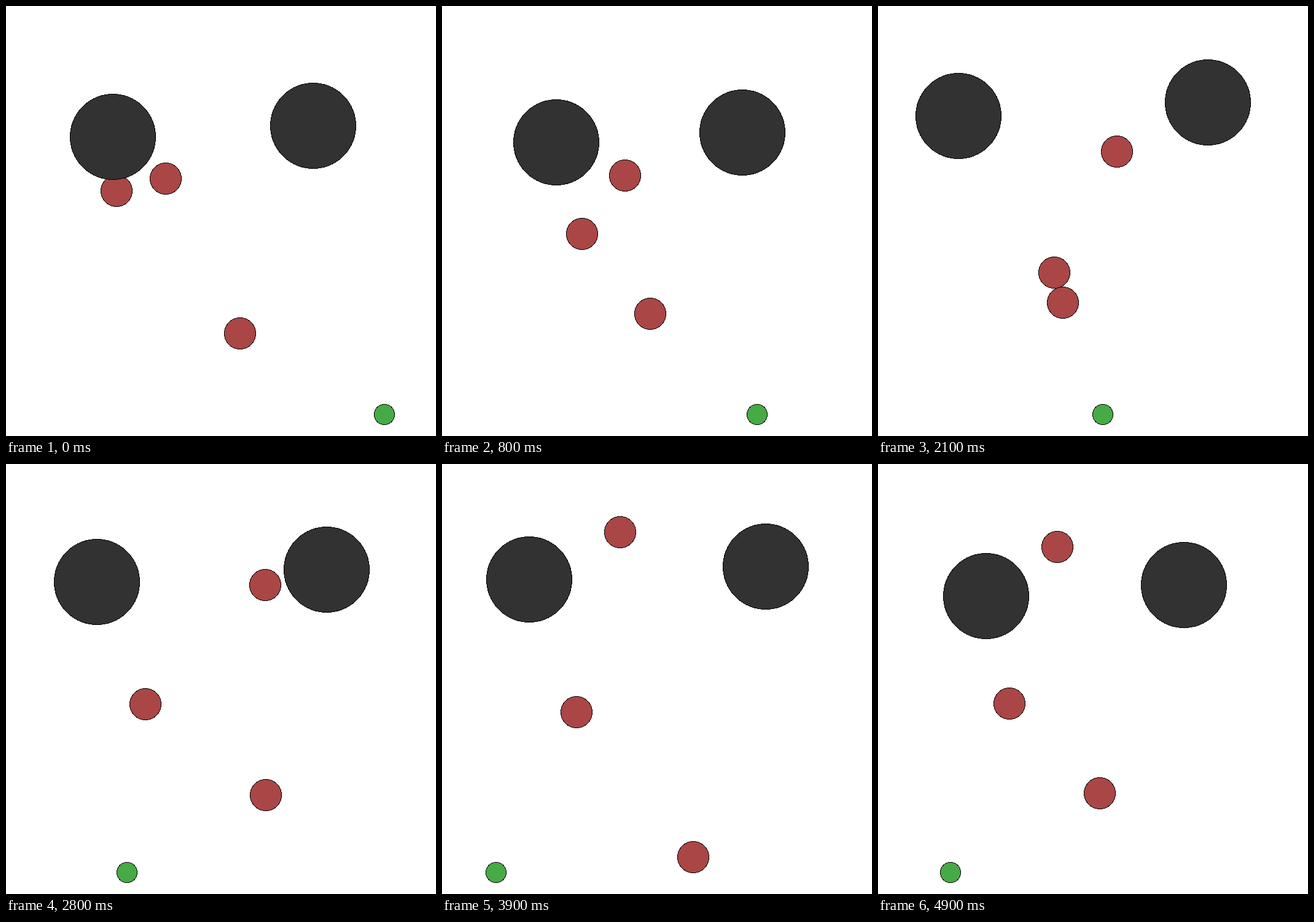
Animation, 700 px wide and 700 px high, one loop 5000 ms. Source, as an HTML page with a canvas:

```html
<!DOCTYPE html>
<html>
<head>
<meta charset="utf-8">
<style>
html, body { margin: 0; height: 100%; overflow: hidden; background: #fff; }
canvas { display: block; }
</style>
</head>
<body>
<canvas id="stage" width="700" height="700"></canvas>
<script>
const ctx = document.getElementById('stage').getContext('2d');
const LOOP = 5000, STEP = 100, MID = 350, WALL = 35, FLOOR = 665;
const RED = 'rgb(170,70,70)', GREEN = 'rgb(70,170,70)', DARK = 'rgb(50,50,50)';

// Waypoints, all reached at the same beats (seconds)
const beats = [0, .8, 2.1, 2.8, 3.5, 3.7, 4.3, 4.9];
const reds = [
  { x: [381, 339, 301, 423, 417, 414, 398, 361], y: [533, 501, 483, 539, 649, 655, 584, 536] },
  { x: [180, 228, 287, 227, 267, 247, 177, 214], y: [301, 371, 434, 391, 395, 399, 413, 390] },
  { x: [260, 298, 389, 422, 336, 312, 262, 292], y: [281, 276, 237, 197, 118, 95, 157, 135] }
];
const run = [616, 513, 366, 197, 148, 125, 29, 118];

// The dark pair swings in and out from the middle; these are its turns
const turns = [0, .3, 1.05, 2.5, 2.95, 3.66, 5, 6];
const reach = [1, 1.078, .879, 1.331, 1.084, 1.198, .983, 1.1];
const pair = [[-175.5, -136.8], [150.2, -154.5]];

// Smooth curve through the values, at rest wherever the direction turns
function glide(times, values, t) {
  const last = times.length - 1;
  const slope = i => (values[i + 1] - values[i]) / (times[i + 1] - times[i]);
  const speed = i => {
    const a = slope(Math.max(i - 1, 0)), b = slope(Math.min(i, last - 1));
    return a * b > 0 ? 2 * a * b / (a + b) : 0;
  };
  let i = 0;
  while (i < last - 1 && t >= times[i + 1]) i++;
  const h = times[i + 1] - times[i], u = (t - times[i]) / h, v = 1 - u;
  return v * v * (1 + 2 * u) * values[i] + u * u * (3 - 2 * u) * values[i + 1]
    + h * u * v * (v * speed(i) - u * speed(i + 1));
}

// Hard-edged disc, one pixel row at a time
function disc(x, y, r, fill) {
  ctx.fillStyle = fill;
  for (let row = -r; row < r; row++) {
    const w = Math.round(Math.sqrt(r * r - (row + .5) ** 2));
    ctx.fillRect(x - w, y + row, 2 * w, 1);
  }
}

function ball(x, y, r, fill) {
  x = Math.floor(x + 1e-6);
  y = Math.floor(y + 1e-6);
  disc(x, y, r, '#000');
  disc(x, y, r - 1, fill);
}

function draw(now) {
  const t = Math.floor(now % LOOP / STEP) * STEP / 1000;
  ctx.clearRect(0, 0, 700, 700);
  for (const { x, y } of reds) ball(glide(beats, x, t), glide(beats, y, t), 26, RED);

  // Past the wall the green ball climbs instead
  const x = glide(beats, run, t);
  ball(Math.max(x, WALL), FLOOR - Math.max(WALL - x, 0), 17, GREEN);

  const k = glide(turns, reach, t);
  for (const [dx, dy] of pair) ball(MID + dx * k, MID + dy * k, 70, DARK);
}

let start;
function tick(now) {
  start ??= now;
  draw(now - start);
  requestAnimationFrame(tick);
}
draw(0);
requestAnimationFrame(tick);
</script>
</body>
</html>
```
